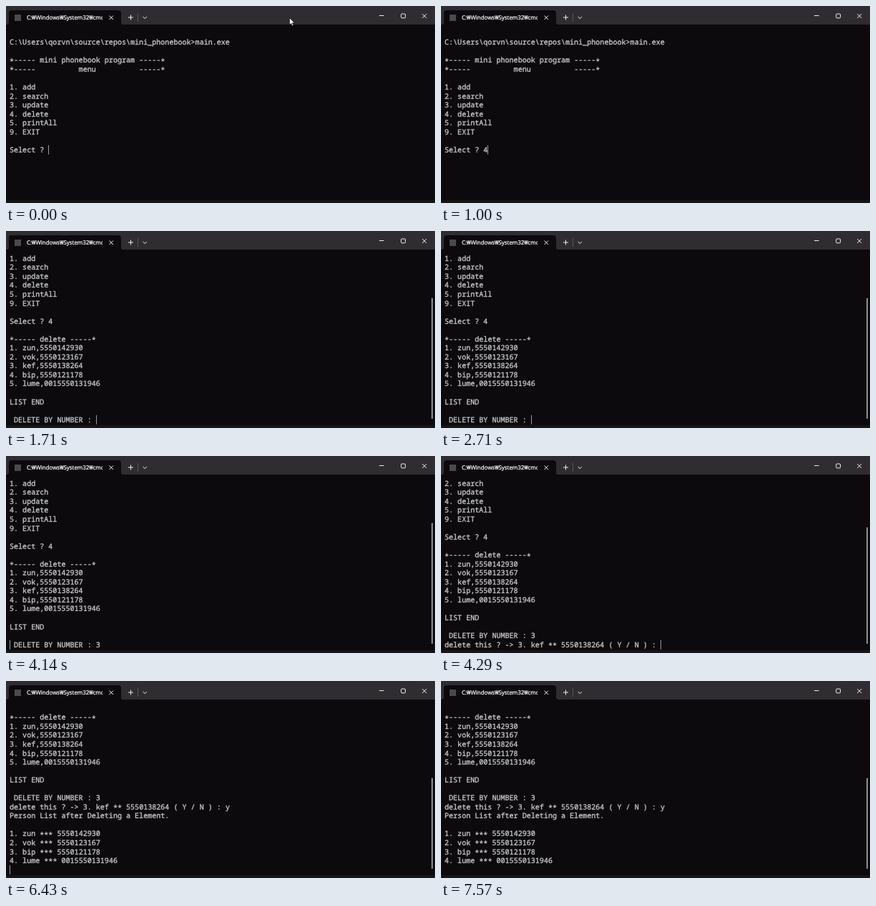
An HTML page for the animation above (8 s loop, 600 px wide and 276 px high).

```html
<!DOCTYPE html>
<html lang="en">
<head>
<meta charset="utf-8">
<title>Mini phonebook</title>
<style>
  html, body { margin: 0; width: 100%; height: 100%; overflow: hidden; background: #0c0a0d; }
  #stage { position: relative; width: 600px; height: 276px; overflow: hidden; background: #0c0a0d; }
  #chrome { position: absolute; left: 0; top: 0; }
  #screen, #caret, #thumb { position: absolute; }
  #screen {
    left: 5px; top: 31.8px; margin: 0; color: #ccc;
    font: 500 10.07px/12.55px "Noto Sans Mono", "DejaVu Sans Mono", monospace;
    -webkit-text-stroke: .3px #ccc;
    font-variant-ligatures: none; text-rendering: geometricPrecision; white-space: pre;
  }
  #screen i { position: relative; top: 1.4px; font-style: normal; }
  #caret { width: 1px; height: 13px; background: #9a9a9a; }
  #thumb { left: 595px; width: 2px; background: #908f91; }
  #title {
    position: absolute; left: 29px; top: 11px; width: 106px; overflow: hidden; white-space: nowrap;
    color: #fff; font: 8px/12px "Noto Sans", "Open Sans", sans-serif;
    -webkit-text-stroke: .2px #fff;
    letter-spacing: -.06px; text-rendering: geometricPrecision;
  }
</style>
</head>
<body>
<div id="stage">
  <svg id="chrome" width="600" height="276" fill="none" stroke="#f0f0f0" stroke-width="1">
    <path d="M0 0H600V26H0Z" fill="#2f2d31" stroke="none"/>
    <path d="M1 26Q4 26 4 23V10Q4 6 8 6H157Q161 6 161 10V23Q161 26 164 26Z" fill="#0c0a0d" stroke="none"/>
    <path d="M0 272H600V276H0Z" fill="#161518" stroke="none"/>
    <path d="M12 12h9v9h-9z" fill="#4a4a4c" stroke="none"/>
    <path d="M144.5 13.5l5.5 5.5m0-5.5l-5.5 5.5M171 16h7M174.5 12.5v7M191.5 15l2.7 2.6 2.7-2.6"/>
    <path d="M184.5 10v12" stroke="#5a585c"/>
    <path d="M522 13.5h6.5M582.2 11l6 6m0-6l-6 6"/>
    <rect x="552.7" y="11" width="5.8" height="5.8" rx="1"/>
    <path id="pointer" d="M396.5 16.5v10l2.3-2.1 1.6 3.6 1.7-.8-1.6-3.4h3.1z" fill="#fff" stroke="#111" stroke-width=".8"/>
  </svg>
  <div id="title">C:₩Windows₩System32₩cmd</div>
  <pre id="screen"></pre>
  <div id="thumb"></div>
  <div id="caret"></div>
</div>
<script>
const LOOP = 8000, ROWS = 19, TOP = 31.8, LINE = 12.55, LEFT = 5, CHAR = 6.042;
const people = [['zun', '5550142930'], ['vok', '5550123167'], ['kef', '5550138264'],
                ['bip', '5550121178'], ['lume', '0015550131946']];
const list = (rows, sep) => rows.map((p, i) => `${i + 1}. ${p.join(sep)}\n`).join('');

const intro = `
C:\\Users\\qorvn\\source\\repos\\mini_phonebook>main.exe

*----- mini phonebook program -----*
*-----          menu          -----*

1. add
2. search
3. update
4. delete
5. printAll
9. EXIT

Select ? `;
const victim = people[2];

// [time, text appended, caret shown]
const steps = [
  [0, intro, true],
  [140, '', false],
  [710, '', true],
  [1000, '4', true],
  [1290, `\n\n*----- delete -----*\n${list(people, ',')}\nLIST END\n\n DELETE `, true],
  [1710, 'BY NUMBER : ', true],
  [2290, '', false],
  [2710, '', true],
  [3290, '', false],
  [3710, '', true],
  [3860, '3', true],
  [4140, '\r', true],
  [4290, `\ndelete this ? -> 3. ${victim.join(' ** ')} ( Y / N ) : `, true],
  [4860, '', false],
  [5710, '', true],
  [5860, 'y', true],
  [6430, `\nPerson List after Deleting a Element.\n\n${list(people.filter(p => p !== victim), ' *** ')}`, true],
  [7570, '', false]
];

const $ = id => document.getElementById(id);
const screen = $('screen'), caret = $('caret'), thumb = $('thumb'), pointer = $('pointer');
const thumbTops = { 6: 94, 7: 100, 14: 136 };
let shown = -1;

function render(n) {
  const lines = steps.slice(0, n + 1).map(s => s[1]).join('').split('\n');
  const first = Math.max(0, lines.length - ROWS);
  const last = lines[lines.length - 1];
  const column = last.endsWith('\r') ? 0 : last.length;

  // The leading newline keeps a blank first row from being dropped.
  screen.innerHTML = lines.slice(first).join('\n').replace(/\r/g, '')
    .replace(/>/g, '&gt;').replace(/\*/g, '<i>*</i>');
  caret.style.left = LEFT + column * CHAR + 'px';
  caret.style.top = TOP + (lines.length - 1 - first) * LINE + 'px';
  caret.style.visibility = steps[n][2] ? 'visible' : 'hidden';
  thumb.style.top = thumbTops[first] + 'px';
  thumb.style.height = 263 - thumbTops[first] + 'px';
  thumb.style.visibility = first ? 'visible' : 'hidden';
  pointer.style.visibility = steps[n][0] < 1000 ? 'visible' : 'hidden';
}

const start = performance.now();
function tick() {
  const t = (performance.now() - start) % LOOP;
  const n = steps.filter(s => s[0] <= t).length - 1;
  if (n !== shown) render(shown = n);
  requestAnimationFrame(tick);
}
tick();
</script>
</body>
</html>
```
